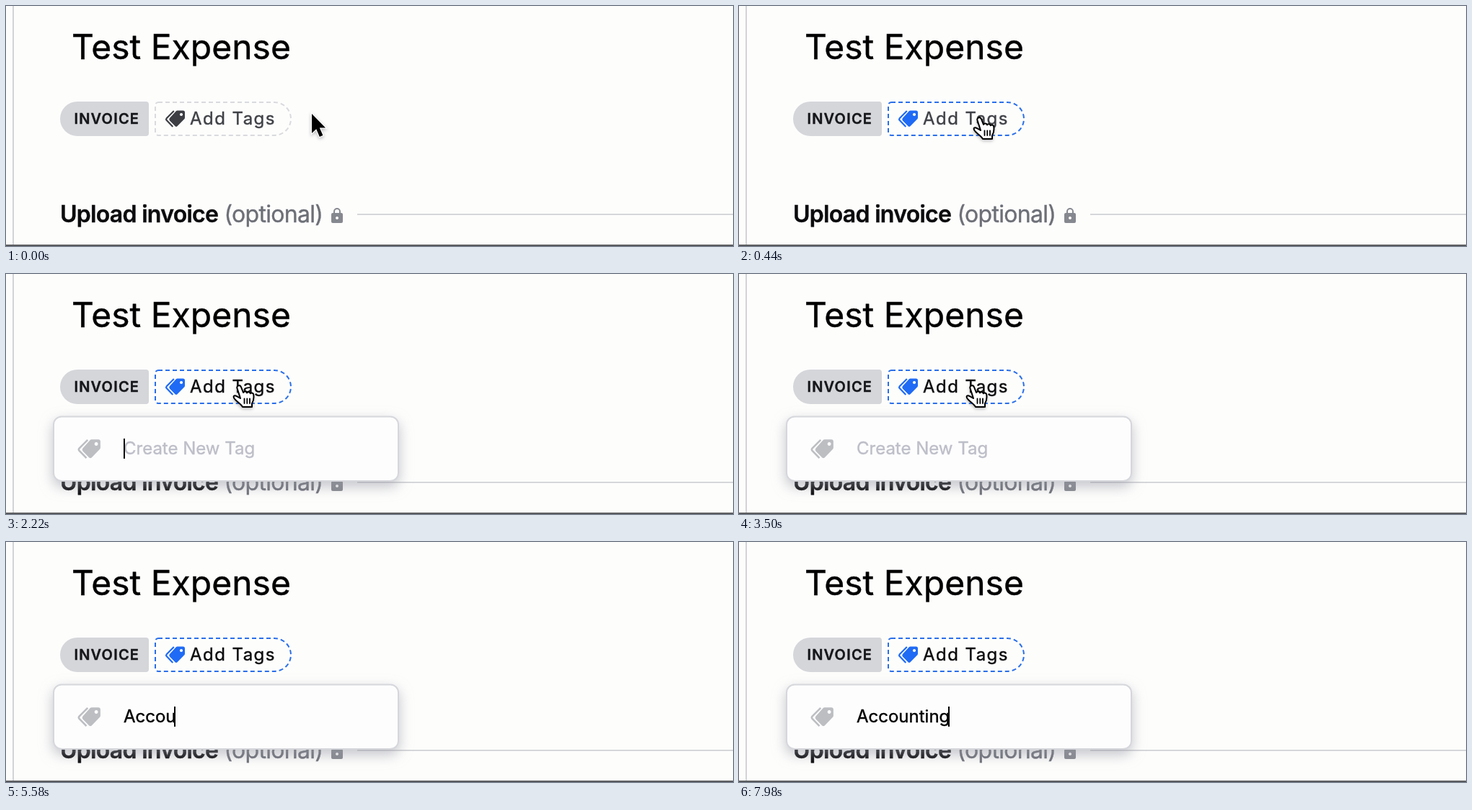
An HTML page for the animation above (8 s loop, 1008 by 334 pixels).

```html
<!DOCTYPE html>
<html lang="en">
<head>
<meta charset="utf-8">
<title>Add tags</title>
<style>
  html, body { margin: 0; width: 100%; height: 100%; overflow: hidden; background: #fdfdfc; }
  svg { display: block; }
  text {
    font-family: Inter, sans-serif; font-optical-sizing: none; white-space: pre;
    fill: currentColor; stroke: currentColor; stroke-width: .4;
  }

  .title { font-size: 48px; color: #000; }
  .head { font-size: 32px; letter-spacing: -.022em; }
  .kind { font-size: 20px; font-weight: 600; letter-spacing: .06em; color: #15161a; }
  .add { font-size: 24px; letter-spacing: .06em; animation: label 8s infinite; }
  .field { font-size: 24px; }
  .dash { fill: none; stroke-width: 2; stroke-dasharray: 6 4; animation: edge 8s infinite; }
  .icon { animation: tint 8s infinite; }
  .popup { animation: open 8s infinite; }
  .card {
    fill: #fdfdfd; stroke: #d6d7dc; stroke-width: 2;
    filter: drop-shadow(0 7px 9px rgba(150, 152, 162, .55));
  }
  .cursor {
    filter: drop-shadow(0 2px 2px rgba(90, 90, 100, .4));
    animation: move 8s infinite, hide 8s step-end infinite;
  }
  .arrow { animation: arrow 8s step-end infinite; }
  .hand { animation: hand 8s step-end infinite; }

  @keyframes move {
    0%, .75% { transform: translate(423px, 149px); animation-timing-function: ease-in-out; }
    5.5% { transform: translate(334px, 155px); animation-timing-function: ease-out; }
    11%, 100% { transform: translate(324px, 155px); }
  }
  @keyframes hide { 0% { opacity: 1; } 47.5%, 100% { opacity: 0; } }
  @keyframes arrow { 0% { opacity: 1; } 2.6%, 100% { opacity: 0; } }
  @keyframes hand { 0% { opacity: 0; } 2.6%, 100% { opacity: 1; } }
  @keyframes edge { 0%, 2.6% { stroke: #d9dade; } 4.2%, 100% { stroke: #2a6fea; } }
  @keyframes tint { 0%, 2.6% { fill: #3c3e44; stroke: #3c3e44; } 4.2%, 100% { fill: #1f6bf5; stroke: #1f6bf5; } }
  @keyframes label { 0%, 23.75% { color: #3f4146; } 25.5%, 100% { color: #0c0c0e; } }
  @keyframes open { 0%, 23.75% { opacity: 0; } 25.5%, 100% { opacity: 1; } }
</style>
</head>
<body>
<svg width="1008" height="334" viewBox="0 0 1008 334">
  <defs>
    <g id="tags">
      <path stroke="none" fill-rule="evenodd" d="M15.5 1.6Q16.2 1 17 1H25Q27.5 1 27.5 3.5V11Q27.5 12 26.8 12.8L17 22.8Q15.5 24 14 22.8L6.4 15Q5 13.2 6.4 11.6ZM22.5 4.4a2.1 2.1 0 1 0 .01 0Z"/>
      <path fill="none" stroke-width="2.2" d="M12.3 1.6L2.2 11.8Q1 13.2 2.2 14.6L10.8 23.4"/>
    </g>
  </defs>

  <rect x="9" width="2" height="332" fill="#d2d3d7"/>
  <rect y="332" width="1008" height="2" fill="#5c5d60"/>

  <text class="title" x="91" y="74">Test Expense</text>

  <path fill="#d5d6da" d="M99 133H194a4 4 0 0 1 4 4V177a4 4 0 0 1-4 4H99a24 24 0 0 1 0-48Z"/>
  <text class="kind" x="94.5" y="164">INVOICE</text>

  <path class="dash" d="M211 134H372a23 23 0 0 1 0 46H211a4 4 0 0 1-4-4V138a4 4 0 0 1 4-4Z"/>
  <use class="icon" href="#tags" x="220.5" y="144.5"/>
  <text class="add" x="255" y="165">Add Tags</text>

  <text class="head" x="75" y="301" font-weight="600" color="#0c0c0e">Upload invoice</text>
  <text class="head" x="302.5" y="301" color="#6d6f77">(optional)</text>
  <g fill="#86888f">
    <path fill-rule="evenodd" d="M453 288H465a2 2 0 0 1 2 2V300a2 2 0 0 1-2 2H453a2 2 0 0 1-2-2V290a2 2 0 0 1 2-2ZM459 293a2 2 0 1 0 .01 0Z"/>
    <path fill="none" stroke="#86888f" stroke-width="2" d="M455 289V286a4 4 0 0 1 8 0V289"/>
  </g>
  <rect x="487" y="289" width="521" height="2" fill="#d5d6da"/>

  <g class="popup">
    <rect class="card" x="66" y="198.5" width="478" height="89.5" rx="11"/>
    <use href="#tags" transform="translate(99 229) scale(1.16)" fill="#bcbec2" stroke="#bcbec2"/>
    <text class="field" id="hint" x="163" y="251" color="#bdbec8">Create New Tag</text>
    <text class="field" id="typed" x="163" y="251" color="#000"></text>
    <rect id="caret" x="163" y="229" width="2" height="28"/>
  </g>

  <g class="cursor">
    <path class="arrow" fill="#000" stroke="#fff" stroke-width="2.4" paint-order="stroke" d="M1 1V28L7.2 22.2L11.8 33L16.4 31L11.8 20.6H20Z"/>
    <g class="hand" transform="translate(-11 -3)" stroke="#000" stroke-width="2" stroke-linejoin="round" stroke-linecap="round">
      <path fill="#fff" d="M12 21L7.5 7C6.5 3.5 11 1.5 12.8 5L16 13C17 11 20.5 11 21 13.5C22 11.5 25.5 12 25.8 14.3C27.3 12.8 30.3 13.8 30.3 16.3C31 22 30 25 28 28V33H15C14 30 9 27 5 23C1.5 20 2 16.5 5.5 17.5C8 18.5 10 20 12 21Z"/>
      <path fill="none" stroke-width="1.8" d="M17.5 21.5V28M21.3 21.5V28M25 21.5V28"/>
    </g>
  </g>
</svg>
<script>
  const LOOP = 8000, OPEN = 1900, BLINK = 500;
  const word = 'Accounting';
  const keys = [3800, 4180, 4480, 5160, 5560, 5960, 6180, 6400, 6760, 7120];
  const [hint, typed, caret] = ['hint', 'typed', 'caret'].map(id => document.getElementById(id));
  let start;

  function draw(now) {
    start ??= now;
    const t = (now - start) % LOOP;
    const count = keys.filter(k => k <= t).length;
    typed.textContent = word.slice(0, count);
    hint.style.opacity = count ? 0 : 1;
    caret.setAttribute('x', 163 + (count ? Math.floor(typed.getComputedTextLength()) - 2 : 0));
    const on = count || Math.floor((t - OPEN) / BLINK) % 2 === 0;
    caret.style.opacity = on ? 1 : 0;
    requestAnimationFrame(draw);
  }
  requestAnimationFrame(draw);
</script>
</body>
</html>
```
